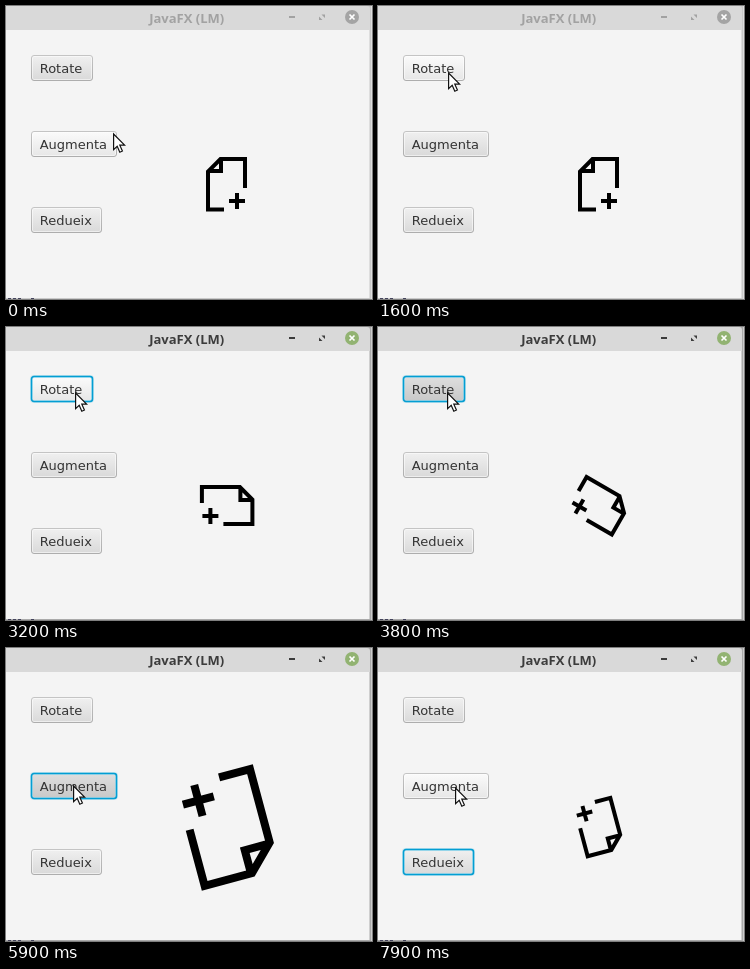
Recreate the animation shown at these times as an HTML page. Size 366 px wide and 293 px high, loop 8000 ms.

```html
<!DOCTYPE html>
<html lang="ca">
<head>
<meta charset="utf-8">
<title>JavaFX (LM)</title>
<style>
  html, body { margin: 0; width: 100%; height: 100%; overflow: hidden; }
  svg { display: block; width: 366px; height: 293px; }

  .desk, .title, .close, .face, .ring, .turn, .cursor {
    animation: 8s step-end infinite;
  }

  /* window frame: inactive until the first press */
  .desk { animation-name: desk; }
  .title { animation-name: title; }
  .close { animation-name: close; }
  .title text { font: bold 13px "Noto Sans", sans-serif; text-anchor: middle; }
  @keyframes desk { 0% { fill: #c9c9c9; } 25% { fill: #aaa; } }
  @keyframes title { 0% { fill: #a2a2a2; } 25% { fill: #3c3c3c; } }
  @keyframes close { 0% { fill: #a4a4a4; } 25% { fill: #92b372; } }

  /* buttons */
  .button text { font: 13px "DejaVu Sans", sans-serif; fill: #333; }
  .edge { fill: none; stroke: url(#border); }
  .shine { fill: none; stroke: #fff; stroke-opacity: .55; }
  .ring { fill: none; visibility: hidden; }
  .ring .line { stroke: #039ed3; stroke-width: 1.5; }
  .ring .glow { stroke: #039ed3; stroke-opacity: .2; stroke-width: 3; }

  .rotate .face { animation-name: face-rotate; }
  .grow .face { animation-name: face-grow; }
  .shrink .face { animation-name: face-shrink; }
  .rotate .ring { animation-name: ring-rotate; }
  .grow .ring { animation-name: ring-grow; }
  .shrink .ring { animation-name: ring-shrink; }

  @keyframes face-rotate {
    0%, 55% { fill: url(#normal); }
    18.75%, 26.25%, 30%, 32.5%, 35%, 37.5%, 40%, 42.5%, 46.25%, 48.75%, 51.25%, 53.75% { fill: url(#hover); }
    25%, 28.75%, 31.25%, 33.75%, 36.25%, 38.75%, 41.25%, 43.75%, 47.5%, 50%, 52.5% { fill: url(#armed); }
  }
  @keyframes face-grow {
    0%, 57.5%, 62.5%, 75%, 98.75% { fill: url(#hover); }
    3.75%, 80% { fill: url(#normal); }
    60%, 73.75% { fill: url(#armed); }
  }
  @keyframes face-shrink {
    0%, 97.5% { fill: url(#normal); }
    81.25%, 91.25% { fill: url(#hover); }
    88.75% { fill: url(#armed); }
  }
  @keyframes ring-rotate { 0%, 60% { visibility: hidden; } 25% { visibility: visible; } }
  @keyframes ring-grow { 0%, 88.75% { visibility: hidden; } 60% { visibility: visible; } }
  @keyframes ring-shrink { 0% { visibility: hidden; } 88.75%, 100% { visibility: visible; } }

  /* icon: 15 degrees per click, then doubled and reset */
  .turn { animation-name: turn, size; }
  .icon { fill: none; stroke: #000; stroke-width: 4; }
  @keyframes turn {
    0% { rotate: 0deg; }
    26.25% { rotate: 15deg; }
    30% { rotate: 30deg; }
    32.5% { rotate: 45deg; }
    35% { rotate: 60deg; }
    37.5% { rotate: 75deg; }
    40% { rotate: 90deg; }
    42.5% { rotate: 105deg; }
    46.25% { rotate: 120deg; }
    48.75% { rotate: 135deg; }
    51.25% { rotate: 150deg; }
    53.75%, 100% { rotate: 165deg; }
  }
  @keyframes size { 0%, 91.25% { scale: 1; } 62.5% { scale: 2; } }

  .cursor { animation-name: point; fill: #fff; stroke: #111; stroke-width: 1.2; }
  @keyframes point {
    0% { translate: 107px 127px; }
    3.75% { translate: 122px 118px; }
    5% { translate: 140px 102px; }
    6.25% { translate: 151px 92px; }
    7.5% { translate: 157px 104px; }
    8.75% { translate: 156px 115px; }
    11.25% { translate: 162px 108px; }
    12.5% { translate: 161px 98px; }
    13.75% { translate: 152px 89px; }
    15% { translate: 131px 81px; }
    16.25% { translate: 109px 75px; }
    17.5% { translate: 91px 70px; }
    18.75% { translate: 76px 67px; }
    20% { translate: 70px 66px; }
    40% { translate: 69px 65px; }
    55% { translate: 72px 122px; }
    57.5% { translate: 70px 131px; }
    58.75% { translate: 67px 137px; }
    80% { translate: 79px 178px; }
    81.25% { translate: 87px 210px; }
    97.5% { translate: 84px 178px; }
    98.75%, 100% { translate: 77px 139px; }
  }
</style>
</head>
<body>
<svg viewBox="0 0 366 293">
  <defs>
    <linearGradient id="normal" x2="0" y2="1"><stop stop-color="#f0f0f0"/><stop offset="1" stop-color="#d9d9d9"/></linearGradient>
    <linearGradient id="hover" x2="0" y2="1"><stop stop-color="#fbfbfb"/><stop offset="1" stop-color="#e6e6e6"/></linearGradient>
    <linearGradient id="armed" x2="0" y2="1"><stop stop-color="#dedede"/><stop offset="1" stop-color="#c8c8c8"/></linearGradient>
    <linearGradient id="border" x2="0" y2="1"><stop stop-color="#c4c4c4"/><stop offset="1" stop-color="#adadad"/></linearGradient>
  </defs>

  <rect class="desk" width="366" height="293"/>
  <path d="M365.5 0V293" stroke="#fff" stroke-opacity=".4"/>
  <path d="M2 292.5H17M25 292.5H30" stroke="#44445c" stroke-dasharray="3 2"/>
  <rect y="23" width="363.5" height="269" fill="#f4f4f4"/>
  <path d="M0 0H361Q364 0 364 3V24H0Z" fill="#d9d9d9"/>

  <g class="title">
    <text x="180.7" y="17">JavaFX (LM)</text>
    <path d="M283 10h6v2h-6zM315.5 8.5h3.5v3.5zM316.5 14h-3.5v-3.5z"/>
  </g>
  <circle class="close" cx="346" cy="11" r="7"/>
  <path d="M343.5 8.5l5 5m0-5l-5 5" stroke="#fff" stroke-width="1.7"/>

  <g class="button rotate" transform="translate(25 49)">
    <rect class="face" x=".5" y=".5" width="61" height="25" rx="2.5"/>
    <rect class="shine" x="1.5" y="1.5" width="59" height="23" rx="1.5"/>
    <rect class="edge" x=".5" y=".5" width="61" height="25" rx="2.5"/>
    <g class="ring">
      <rect class="glow" x=".5" y=".5" width="61" height="25" rx="2.5"/>
      <rect class="line" x=".5" y=".5" width="61" height="25" rx="2.5"/>
    </g>
    <text x="8.7" y="18">Rotate</text>
  </g>
  <g class="button grow" transform="translate(25 125)">
    <rect class="face" x=".5" y=".5" width="85" height="25" rx="2.5"/>
    <rect class="shine" x="1.5" y="1.5" width="83" height="23" rx="1.5"/>
    <rect class="edge" x=".5" y=".5" width="85" height="25" rx="2.5"/>
    <g class="ring">
      <rect class="glow" x=".5" y=".5" width="85" height="25" rx="2.5"/>
      <rect class="line" x=".5" y=".5" width="85" height="25" rx="2.5"/>
    </g>
    <text x="8.7" y="18">Augmenta</text>
  </g>
  <g class="button shrink" transform="translate(25 201)">
    <rect class="face" x=".5" y=".5" width="70" height="25" rx="2.5"/>
    <rect class="shine" x="1.5" y="1.5" width="68" height="23" rx="1.5"/>
    <rect class="edge" x=".5" y=".5" width="70" height="25" rx="2.5"/>
    <g class="ring">
      <rect class="glow" x=".5" y=".5" width="70" height="25" rx="2.5"/>
      <rect class="line" x=".5" y=".5" width="70" height="25" rx="2.5"/>
    </g>
    <text x="8.7" y="18">Redueix</text>
  </g>

  <g transform="translate(220.7 178.7)">
    <g class="turn">
      <path class="icon" d="M18.3 3.3V-25.7H-6.2L-18.7-13.2V24.8H-2.7M-5.7-25.7V-13.7H-18.7M2.3 16.3h16M10.3 8.3v16"/>
    </g>
  </g>

  <g class="cursor">
    <path d="M.6 1V16.6L4.2 13.2L6.8 19.2L9.4 18L6.8 12.2H11.6Z"/>
  </g>
</svg>
</body>
</html>
```
